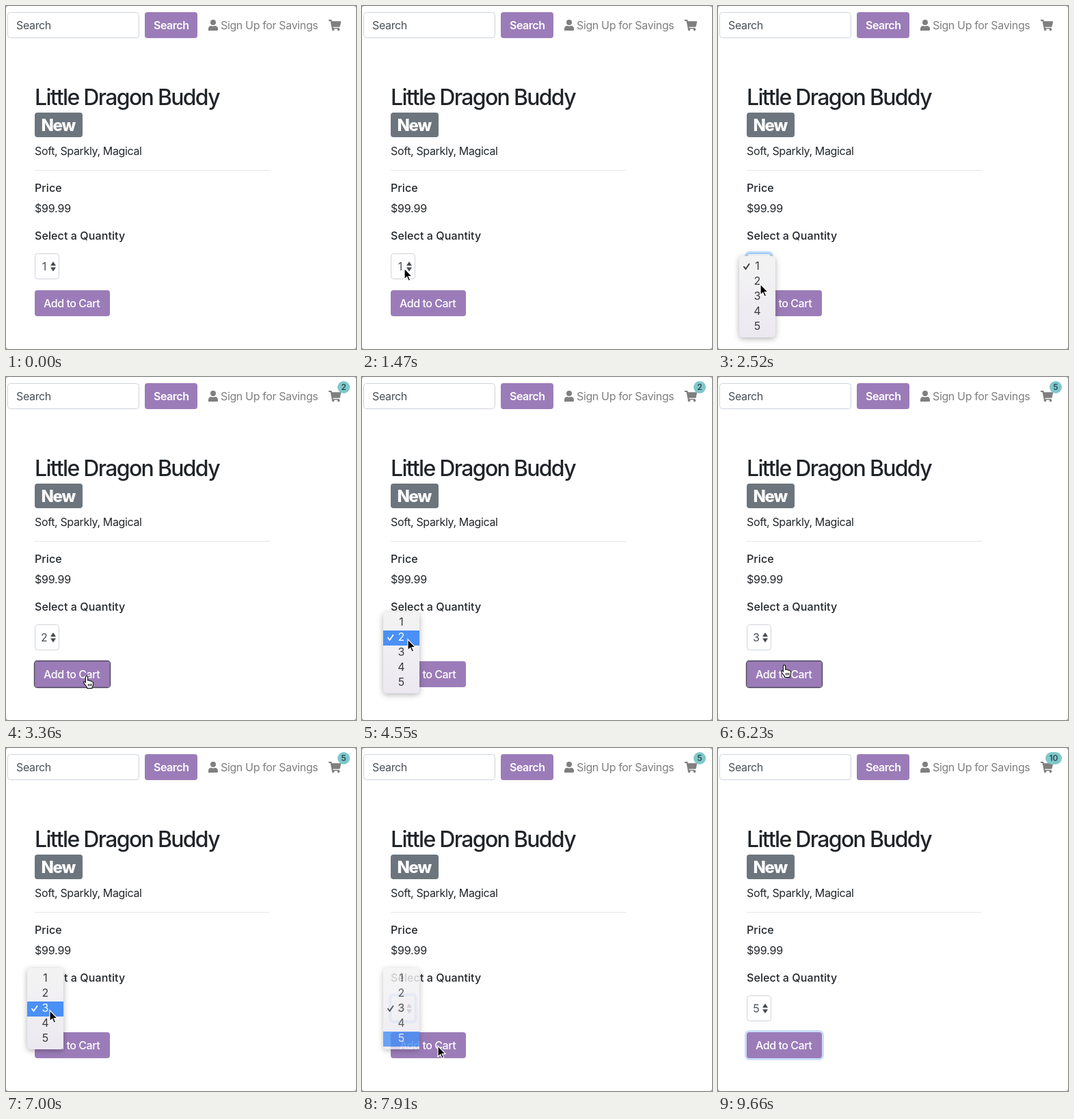
Write an HTML page that moves like this. It is 512 px wide and 502 px high and loops after 9.73 s.

```html
<!DOCTYPE html>
<html lang="en">
<head>
<meta charset="utf-8">
<title>Add to cart</title>
<style>
html, body { margin: 0; width: 100%; height: 100%; overflow: hidden; background: #a9a9a9; }
svg { display: block; }
text { font: 420 16px Inter, "Liberation Sans", sans-serif; letter-spacing: -.36px; fill: #212529; }
.title { font-size: 32px; font-weight: 540; letter-spacing: -1.7px; }
.label { font-weight: 540; letter-spacing: .1px; }
.new { font-size: 24px; font-weight: 800; letter-spacing: -1.3px; fill: #fff; }
.btn { font-weight: 540; letter-spacing: -.46px; fill: #fff; }
.nav { fill: #7f7f7f; }
.field { fill: #fff; stroke: #ced4da; }
.purple { fill: #9b7cb8; }
.mid { text-anchor: middle; letter-spacing: 0; }
#count { font-size: 12px; font-weight: 600; fill: #2f4d52; }
#menuBox { filter: drop-shadow(0 2px 4px rgba(0,0,0,.3)); }
</style>
</head>
<body>
<svg width="512" height="502" viewBox="0 0 512 502">
  <defs>
    <linearGradient id="glass" x1="0" y1="0" x2="0" y2="1">
      <stop offset="0" stop-color="#f3f3f3"/>
      <stop offset=".5" stop-color="#f0eef2"/>
      <stop offset="1" stop-color="#ece8f1"/>
    </linearGradient>
  </defs>
  <rect width="512" height="502" rx="4" fill="#fff"/>

  <rect class="field" x="2.5" y="9.5" width="192" height="37" rx="4"/>
  <text x="15" y="34" style="fill:#495057">Search</text>
  <rect class="purple" x="203" y="9" width="77" height="38" rx="4"/>
  <text class="btn" x="216" y="34" style="font-weight:600">Search</text>
  <g class="nav">
    <circle cx="303" cy="24" r="4"/>
    <path d="M296 36v-2.500q0-4.500 4.500-4.500q2.500 1 5 0q4.500 0 4.500 4.500v1q0 1.500-1.500 1.500z"/>
    <path d="M472 20h3.500q.8 0 1 .8l.3 1.400h12.500q1 0 .8 1l-1.500 6.700q-.2.800-1 .8h-9.300l.3 1.300h8.700v1.500h-10.500l-2.300-11.500h-2.500z"/>
    <circle cx="478.500" cy="34.400" r="1.800"/>
    <circle cx="486.500" cy="34.400" r="1.800"/>
  </g>
  <text class="nav" x="314" y="34">Sign Up for Savings</text>
  <g id="badge">
    <rect id="pill" y="6" height="18" rx="9" fill="#7fc8cc"/>
    <text id="count" class="mid" y="19.300"></text>
  </g>

  <text class="title" x="42" y="145">Little Dragon Buddy</text>
  <rect x="42" y="156" width="70" height="36" rx="4" fill="#6c757d"/>
  <text class="new" x="51.500" y="183">New</text>
  <text x="42" y="218">Soft, Sparkly, Magical</text>
  <rect x="42" y="240" width="344" height="1" fill="#e5e5e5"/>
  <text class="label" x="42" y="272">Price</text>
  <text x="42" y="302" style="letter-spacing:-.2px">$99.99</text>
  <text class="label" x="42" y="342">Select a Quantity</text>

  <rect id="selectGlow" x="39" y="359" width="42" height="44" rx="7" fill="#bfdcfb"/>
  <rect id="select" class="field" x="42.500" y="362.500" width="35" height="37" rx="4"/>
  <text id="value" class="mid" x="56" y="387" style="fill:#495057"></text>
  <path d="M65 380l4-6 4 6zM65 382.500h8l-4 6z" fill="#454b51"/>

  <rect id="btnGlow" x="39" y="413" width="116" height="44" rx="7" fill="#cbdcfb"/>
  <rect class="purple" x="42" y="416" width="110" height="38" rx="4"/>
  <rect id="press" x="41.500" y="415.500" width="111" height="39" rx="4" fill="none" stroke="#4b4257" stroke-width="1.300"/>
  <text class="btn" x="55" y="441">Add to Cart</text>

  <g id="menu">
    <rect id="menuBox" x="31" width="53" height="119" rx="5" fill="url(#glass)"/>
    <rect id="bar" x="31" width="53" height="22" fill="#4a90f5"/>
    <path id="check" d="M37.500 0l3 4 5.500-8" fill="none" stroke-width="1.800"/>
    <g id="items"></g>
  </g>

  <g id="cursor">
    <path id="arrow" d="M0 0V16L3.700 12.600 6.100 18.200 8.600 17.100 6.200 11.700H11.200Z" fill="#000" stroke="#fff" stroke-width="1.200"/>
    <path id="hand" d="M-1.600 1.200q0-1.600 1.600-1.600t1.600 1.600v5q2.400-.9 2.900.7q2.300-.6 2.700.9q2.300-.3 2.300 1.800v2.600q0 2.200-1.400 3.600v1.800h-7.600v-1.400l-5-6.500q-.6-2 1.600-2l1.300 1.600z M2.500 11v3.500M4.700 11v3.500M6.800 11v3.500" fill="#fff" stroke="#111" stroke-width="1.100" stroke-linejoin="round"/>
  </g>
</svg>
<script>
const LOOP = 9730, TICK = 70, ROW = 22, PAD = 5;
const $ = id => document.getElementById(id);
const show = (id, on) => { $(id).style.display = on ? '' : 'none'; };
const set = (id, attrs) => { for (const k in attrs) $(id).setAttribute(k, attrs[k]); };

// Each round: menu opens, an item is picked, the button is clicked.
const rounds = [
  { open: 1540, pick: 2450, add: 3290, from: 1, to: 2, total: 2 },
  { open: 4410, pick: 5320, add: 6160, from: 2, to: 3, total: 5 },
  { open: 7000, pick: 7630, add: 8470, from: 3, to: 5, total: 10 }
];
const FADE_AT = 210, FADE = 400;

// Pointer stops: time, x, y
const path = [
  [0, 116, 520], [70, 110, 484], [350, 82, 430], [700, 66, 388], [840, 66, 388],
  [1190, 62, 384], [1680, 62, 384], [2380, 62, 407], [2590, 62, 407],
  [3080, 118, 438], [3500, 118, 438], [4200, 67, 384], [4690, 67, 384],
  [5180, 66, 405], [5530, 66, 405], [6090, 97, 422], [6370, 97, 422],
  [6930, 64, 384], [7420, 64, 384], [7560, 66, 425], [7700, 66, 425],
  [7910, 111, 436], [8330, 108, 430], [8820, 108, 430], [9380, 150, 510], [LOOP, 150, 520]
];

const items = [1, 2, 3, 4, 5].map(n => {
  const el = document.createElementNS('http://www.w3.org/2000/svg', 'text');
  el.setAttribute('x', 57.5);
  el.setAttribute('class', 'mid');
  el.textContent = n;
  return $('items').appendChild(el);
});

function pointer(t) {
  const i = path.findIndex(p => p[0] > t);
  const [t0, x0, y0] = path[i - 1], [t1, x1, y1] = path[i];
  const u = (t - t0) / (t1 - t0), e = u * u * (3 - 2 * u);
  return [x0 + (x1 - x0) * e, y0 + (y1 - y0) * e];
}

function drawMenu(r, t, y) {
  const top = 366 - ROW * (r.from - 1);
  const rowTop = n => top + PAD + ROW * (n - 1);
  const since = t - r.pick;
  let row = Math.min(5, Math.max(1, Math.floor((y - top - PAD) / ROW) + 1));
  // The picked row blinks off once before the menu fades.
  if (since >= 0) row = since >= TICK && since < 2 * TICK ? 0 : r.to;
  set('menuBox', { y: top });
  set('bar', { y: rowTop(row) });
  show('bar', row);
  set('check', {
    transform: `translate(0 ${rowTop(r.from) + 10})`,
    stroke: row === r.from ? '#fff' : '#333'
  });
  items.forEach((el, i) => {
    el.setAttribute('y', rowTop(i + 1) + 15.2);
    el.style.fill = row === i + 1 ? '#fff' : '#3c3c3e';
  });
  $('menu').style.opacity = Math.min(1, 1 - (since - FADE_AT) / FADE);
}

function draw(t) {
  const [x, y] = pointer(t);
  const menuEnd = r => r.pick + FADE_AT + FADE;
  const active = rounds.find(r => t >= r.open && t < menuEnd(r));
  const picked = rounds.filter(r => t >= menuEnd(r)).pop();
  const added = rounds.filter(r => t >= r.add).pop();
  const selecting = rounds.some(r => t >= r.open && t < r.add);
  const hover = !active && x >= 42 && x <= 152 && y >= 416 && y <= 454;
  const focused = added && !selecting;

  $('value').textContent = picked ? picked.to : 1;
  show('selectGlow', selecting);
  $('select').style.stroke = selecting ? '#80bdff' : '';
  show('btnGlow', focused && !hover);
  show('press', focused && hover);

  show('badge', added);
  if (added) {
    const wide = added.total > 9;
    set('pill', { x: wide ? 479 : 485, width: wide ? 24 : 18 });
    set('count', { x: wide ? 491 : 494 });
    $('count').textContent = added.total;
  }

  show('menu', active);
  if (active) drawMenu(active, t, y);

  set('cursor', { transform: `translate(${x.toFixed(1)} ${y.toFixed(1)})` });
  show('hand', hover);
  show('arrow', !hover);
}

const start = performance.now();
function frame() {
  const t = (performance.now() - start) % LOOP;
  draw(Math.floor(t / TICK) * TICK);
  requestAnimationFrame(frame);
}
frame();
</script>
</body>
</html>
```
